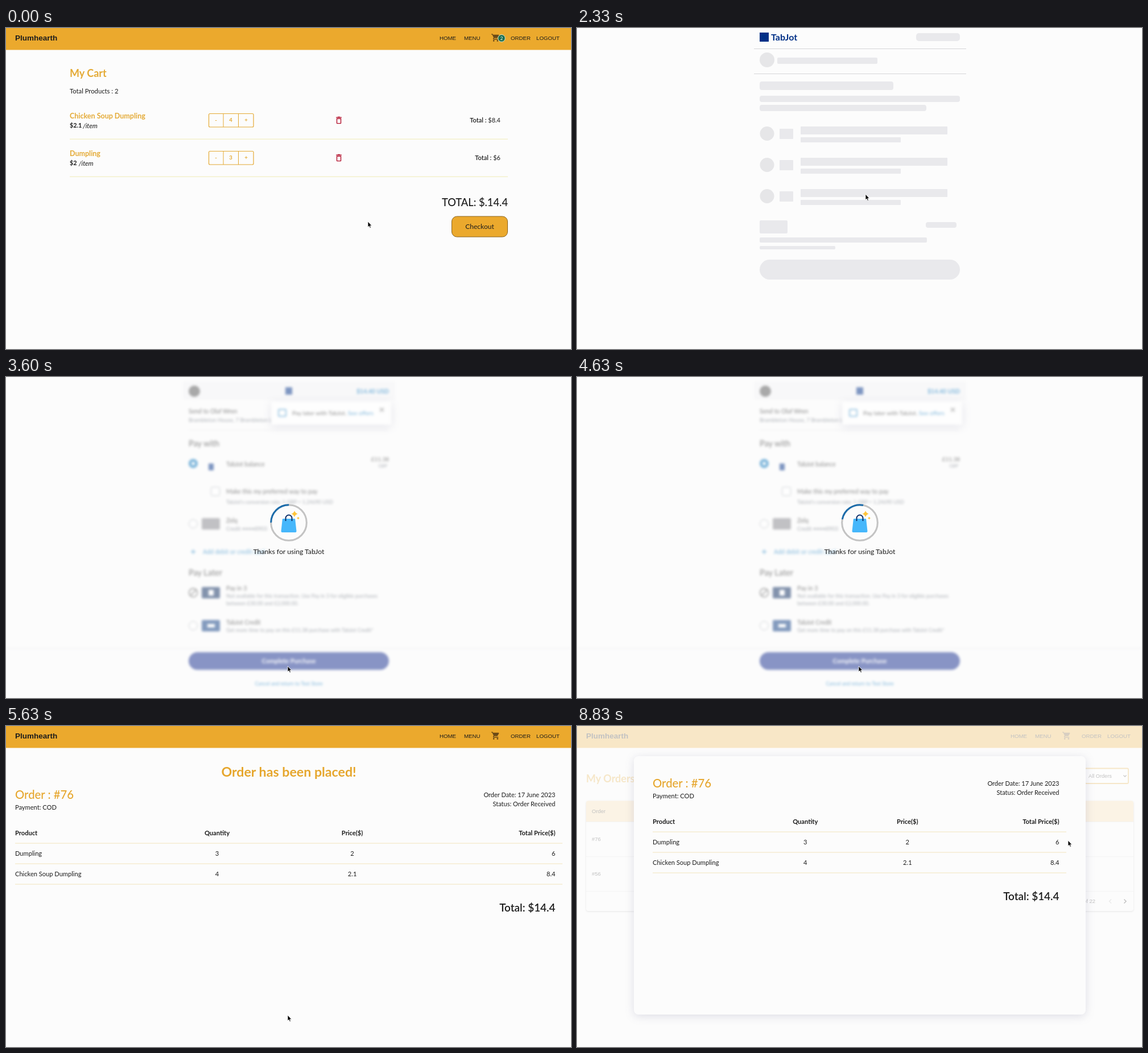
An HTML page that plays this animation: 993x564 px, repeating every 8.91 s.

```html
<!DOCTYPE html>
<html lang="en">
<head>
<meta charset="utf-8">
<title>Cart checkout</title>
<style>
html, body { margin: 0; width: 100%; height: 100%; overflow: hidden; background: #fcfcfc; }
svg { display: block; width: 993px; height: 564px; font-family: Lato, sans-serif; }
.ui { font-family: "Liberation Sans", Arial, sans-serif; }
text { white-space: pre; }
</style>
</head>
<body>
<svg id="stage" viewBox="0 0 993 564"></svg>
<script>
const LOOP = 8910, BG = '#fcfcfc', AMBER = '#eba92d', GOLD = '#e4aa35', INK = '#1c1c1c', RULE = '#f2e4bc';
const BLUE = '#0070ba', NAVY = '#142c8e';

// Drawing helpers; text is placed by its vertical middle.
const text = (x, y, s, size = 11.1, o = {}) =>
  `<text x="${x}" y="${y + size * .36}" font-size="${size}" fill="${o.fill || INK}" font-weight="${o.w || 400}"
    text-anchor="${o.at || 'start'}" ${o.more || ''}>${s}</text>`;
const mid = (x, y, s, size, o) => text(x, y, s, size, {...o, at: 'middle'});
const end = (x, y, s, size, o) => text(x, y, s, size, {...o, at: 'end'});
const box = (x, y, w, h, fill, r = 0, more = '') =>
  `<rect x="${x}" y="${y}" width="${w}" height="${h}" rx="${r}" fill="${fill}" ${more}/>`;
const dot = (x, y, r, fill, more = '') => `<circle cx="${x}" cy="${y}" r="${r}" fill="${fill}" ${more}/>`;
const path = (d, fill, more = '') => `<path d="${d}" fill="${fill}" ${more}/>`;
const line = (d, stroke, w = 1) => path(d, 'none', `stroke="${stroke}" stroke-width="${w}"`);
const group = (id, body, more = '') => `<g id="${id}" ${more}>${body}</g>`;
const shadow = a => `style="filter:drop-shadow(0 3px 8px rgba(60,60,110,${a}))"`;

const CART = 'M7 18a2 2 0 1 0 0 4a2 2 0 0 0 0-4zM1 2v2h2l3.6 7.59-1.35 2.45C4.5 15.4 5.5 17 7 17h12v-2H7.42l-.22-.37.9-1.63h7.45c.75 0 1.41-.41 1.75-1.03L20.9 5.5 20 4H5.21l-.94-2zm16 16a2 2 0 1 0 0 4a2 2 0 0 0 0-4z';
const BIN = 'M6 19c0 1.1.9 2 2 2h8c1.1 0 2-.9 2-2V7H6zM8 9h8v10H8zm7.5-5l-1-1h-5l-1 1H5v2h14V4z';

function header() {
  const nav = [[762, 'HOME'], [805, 'MENU'], [887, 'ORDER'], [932, 'LOGOUT']];
  return box(0, 0, 993, 38.5, AMBER) +
    group('hover', box(883, 7, 42, 21, 'rgba(0,0,0,.05)', 3)) +
    `<g class="ui">${text(16, 17.5, 'Plumhearth', 13.5, {w: 700})}
    ${nav.map(([x, s]) => text(x, 17.3, s, 9.7)).join('')}</g>` +
    path(CART, '#6b4a17', 'transform="translate(852.5 9) scale(.67)"') +
    group('badge', dot(871, 18, 6.3, '#1b6f50', 'stroke="#d9e6cf"') + mid(871, 18, '2', 8, {fill: '#fff'}));
}

function cartRow(y, name, price, count, total) {
  const bold = {w: 700, fill: GOLD};
  return text(112, y - 7.5, name, 12.5, bold) +
    text(112, y + 9.5, price, 10.8, {w: 700}) +
    text(120.5 + price.length * 3.6, y + 9.5, '/item', 11.5, {more: 'font-style="italic"'}) +
    box(356.5, y - 11.5, 78.5, 23.5, 'none', 2, `stroke="${GOLD}" stroke-width="1.2"`) +
    line(`M382 ${y - 12}v24M408.5 ${y - 12}v24`, GOLD) +
    [[369, '-'], [395, count], [422, '+']].map(([x, s]) => mid(x, y, s, 9.5, bold)).join('') +
    path(BIN, '#b3112d', `transform="translate(576.6 ${y - 8.4}) scale(.7)"`) +
    end(869, y, `<tspan font-weight="600">Total :</tspan> ${total}`, 11) +
    line(`M112 ${y + 33.2}h770`, '#f0ebb5');
}

function cartPage() {
  return text(112, 80, 'My Cart', 18, {w: 700, fill: GOLD}) +
    text(112, 111.3, 'Total Products : 2', 11.25) +
    cartRow(162, 'Chicken Soup Dumpling', '$2.1', 4, '$8.4') +
    cartRow(228, 'Dumpling', '$2', 3, '$6') +
    end(882, 306, 'TOTAL: $.14.4', 18.3, {w: 500}) +
    group('checkout', box(783.5, 331, 98, 36, AMBER, 9, 'stroke="#8a6420"') + mid(832.5, 349, 'Checkout', 12.1));
}

const payBox = () =>
  box(399, 218, 197, 124, BG, 8, shadow(.2)) +
  text(431, 259, 'Pay with tabjot', 11.3, {w: 700, fill: '#e39a2a'}) +
  box(431, 282.5, 132, 23, '#f7bb2f', 3) +
  box(478, 289, 9, 9, '#003087') + text(490, 294, 'TabJot', 10, {w: 700, fill: '#003087'});

function skeleton() {
  const bar = (x, y, w, h, r = 2) => box(x, y, w, h, '#e9e9ec', r);
  const disc = (y, r) => dot(334, y, r, '#e6e6e8');
  return box(321, 8, 16, 16, '#003087') + text(341, 16.5, 'TabJot', 16, {w: 700, fill: '#003087'}) +
    line('M311 36.500h373M311 80.500h373', '#d6d6d8') + disc(56, 13) +
    [[596, 9, 77, 14, 5], [352, 52, 176, 11], [321, 94, 235, 15, 4], [321, 119, 352, 11, 4], [321, 135, 293, 11, 4],
      [321, 338, 49, 23], [613, 341, 54, 10, 4], [321, 368, 294, 9], [321, 383, 133, 6], [321, 407, 352, 35, 17.5]]
      .map(a => bar(...a)).join('') +
    [173, 228, 283].map(y => disc(y + 12.5, 12.5) + bar(356, y + 4, 24, 18, 1) +
      bar(393, y, 258, 14, 1) + bar(393, y + 19, 176, 9, 1)).join('');
}

function payPage() {
  const soft = {fill: '#5c6470'}, blue = {fill: BLUE};
  const radio = y => dot(329, y, 7.5, '#fff', 'stroke="#9aa0a8"');
  const card = (y, fill) => box(344, y - 10, 32, 20, fill, 2);
  return box(311, 8, 373, 32, '#f4f4f6') + dot(331, 25, 10, '#555') + box(491, 18, 12, 13, '#003087') +
    end(673, 25, '$14.40 USD', 10.5, {...blue, w: 700}) +
    text(321, 60, 'Send to Olaf Wren', 10.5) + text(321, 76, 'Brambleton House, 7 Brambleton Lane', 9.5, soft) +
    line('M321 93h352', '#e2e2e6') +
    box(466, 43, 211, 41, '#fff', 3, shadow(.25)) + box(479, 57, 13, 12, 'none', 1, `stroke="${BLUE}" stroke-width="1.5"`) +
    text(503, 63, `Pay later with TabJot. <tspan fill="${BLUE}">See offers</tspan>`, 10.3) +
    line('M657 54l7 7m0-7l-7 7', '#555', 1.2) +
    text(321, 117, 'Pay with', 14.5) + dot(329, 152, 5.5, '#fff', `stroke="${BLUE}" stroke-width="5"`) +
    box(356, 152, 9, 12, '#003087') + text(387, 153, 'TabJot balance', 10.5) +
    end(673, 144, '£11.38', 10) + end(670, 156, 'GBP', 8, soft) +
    box(360.5, 193.5, 15, 15, '#fff', 2, 'stroke="#9aa0a8"') + text(387, 201, 'Make this my preferred way to pay', 10.6) +
    text(387, 220, "TabJot's conversion rate: 1 GBP = 1.24690 USD", 9, soft) +
    radio(258) + card(258, '#85858b') + text(387, 252, 'Zelq', 10.5) + text(387, 267, 'Credit ••••8903', 9.5, soft) +
    line('M325 307h8m-4-4v8', BLUE, 1.3) + text(346, 307, 'Add debit or credit card', 10.5, blue) +
    text(321, 344, 'Pay Later', 14.5) + dot(329, 379, 7.5, 'none', 'stroke="#333" stroke-width="1.4"') + line('M324 384l10-10', '#333', 1.4) +
    card(379, '#0a2a5e') + box(356, 374, 9, 10, '#fff') + text(387, 371, 'Pay in 3', 10.5) +
    text(387, 385, 'Not available for this transaction. Use Pay in 3 for eligible purchases', 9, soft) +
    text(387, 398, 'between £30.00 and £2,000.00.', 9, soft) +
    radio(437) + card(437, '#0a3a80') + box(354, 434, 13, 6, '#fff') + text(387, 431, 'TabJot Credit', 10.5) +
    text(387, 445, 'Get more time to pay on this £11.38 purchase with TabJot Credit*', 9, soft) +
    line('M0 476.500h993', '#dddde4') + box(321, 483.5, 352, 31, NAVY, 15.5) +
    mid(497, 499, 'Complete Purchase', 11, {w: 700, fill: '#fff'}) +
    mid(497, 538.5, 'Cancel and return to Test Store', 8.8, blue);
}

function thanks() {
  const star = (x, y, r) => path(`M${x} ${y - r}q${r * .25} ${r * .75} ${r} ${r}q${-r * .75} ${r * .25} ${-r} ${r}q${-r * .25} ${-r * .75} ${-r} ${-r}q${r * .75} ${-r * .25} ${r} ${-r}z`, '#ffc439');
  return dot(497, 256, 31.3, 'none', 'stroke="#c3c3c3" stroke-width="3"') +
    group('arc', line('M465.7 256A31.3 31.3 0 0 1 497 224.7', '#1b6cab', 3)) +
    path('M487 249h20q1 0 1.2 1l2.3 21q0 2-2 2h-23q-2 0-2-2l2.3-21q.2-1 1.2-1z', '#46b7fb') +
    line('M491.5 253v-5a5.5 5.5 0 0 1 11 0v5', '#0b2f6b', 2) + star(507, 240.5, 5.5) + star(513.5, 248, 2.5) +
    mid(497, 307, 'Thanks for using TabJot', 12.2);
}

// Order summary: left edge, width and title height.
function order(x, w, y) {
  const row = (dy, cells, o) => cells.map((s, i) =>
    [text, mid, mid, end][i](x + [0, w * .369, w * .616, w - 12.5][i], y + dy, s, 11.1, o)).join('') +
    line(`M${x} ${y + dy + 18}h${w}`, RULE);
  const right = x + w - 12.5;
  return text(x, y, 'Order : #76', 20.3, {w: 500, fill: '#e6a62c'}) + text(x, y + 22, 'Payment: COD') +
    end(right, y, 'Order Date: 17 June 2023', 11) + end(right, y + 16, 'Status: Order Received', 11) +
    row(67, ['Product', 'Quantity', 'Price($)', 'Total Price($)'], {w: 700}) +
    row(103, ['Dumpling', 3, 2, 6]) + row(139, ['Chicken Soup Dumpling', 4, 2.1, 8.4]) +
    end(right, y + 198.5, 'Total: $14.4', 18.9, {w: 600});
}

function orderList() {
  const row = (y, id, status, time, fill, ink) => text(26, y, id, 9.5) +
    box(309.5, y - 10, 118, 20, fill, 10, `stroke="${ink}"`) +
    mid(369, y, status, 9.4, {w: 600, fill: ink, more: 'font-family="Lato, sans-serif" letter-spacing=".3"'}) +
    mid(695.5, y, time, 9.5) +
    line(`M853 ${y - 2}q7.3-10 14.6 0q-7.3 10-14.6 0z`, '#dfa336', 1.3) +
    dot(860.3, y - 2, 2.3, 'none', 'stroke="#dfa336" stroke-width="1.3"');
  return text(16, 93, 'My Orders', 18, {w: 700, fill: GOLD}) +
    `<g class="ui">${box(893, 74.5, 76, 26.5, '#fff', 2, `stroke="${GOLD}" stroke-width="1.8"`)}
    ${text(899, 88, 'All Orders', 9.2)}${line('M960.5 86.5l2.5 2.7 2.5-2.7', '#333', 1.2)}
    ${box(16, 131.5, 962, 193.5, BG, 4, 'style="filter:drop-shadow(0 1px 1.5px rgba(0,0,0,.35))"')}
    ${path('M16 168.5V135.5q0-4 4-4H974q4 0 4 4V168.5z', '#fadba2')}
    ${text(26, 150, 'Order', 9.5)}${mid(369, 150, 'Status', 9.5)}${mid(695.5, 150, 'Time', 9.5)}${mid(868, 150, 'Actions', 9.5)}
    ${line('M16 168.5h962M16 229.5h962M16 290.5h962', '#dedede')}
    ${row(199, '#76', 'Order Received', 'a few seconds ago', '#bfdaf8', '#6384b4')}
    ${row(260, '#56', 'Completed', '4 months ago', '#cdebd0', '#67a06c')}
    ${end(911, 308, '1–6 of 22', 9.5)}${line('M939 304.5l-3.5 3.5 3.5 3.5', '#b5b5b5', 1.4)}
    ${line('M961.5 304.5l3.5 3.5-3.5 3.5', '#222', 1.6)}</g>`;
}

const spokes = () => Array.from({length: 12}, (_, i) =>
  `<path class="spoke" d="M497 267.5v-14" stroke="${AMBER}" stroke-width="6.5" stroke-linecap="round" transform="rotate(${i * 30} 497 280)"/>`).join('');

const veil = (id, fill) => group(id, box(0, 0, 993, 564, fill));

document.getElementById('stage').innerHTML =
  box(0, 0, 993, 564, BG) + header() + group('cart', cartPage()) +
  group('placed', mid(497, 80.5, 'Order has been placed!', 23.2, {w: 700, fill: '#e6a62c'}) + order(16, 962, 121)) +
  group('list', orderList()) + veil('haze', 'rgba(252,252,252,.74)') + group('payBox', payBox()) +
  group('detail', box(100, 53, 794, 454, BG, 8, shadow(.16)) + order(133, 727, 101)) +
  group('loader', box(0, 0, 993, 564, 'rgba(0,0,0,.55)') + spokes()) +
  veil('popup', BG) + group('skeleton', skeleton()) + group('payPage', payPage()) + group('thanks', thanks()) +
  group('status', box(-1, 550.5, 331.5, 15, '#dce7e8', 2, 'stroke="#8b9698"') +
    text(3, 557.5, 'localhost:5173/orders/myorders', 8.2, {fill: '#33474d'}), 'class="ui"') +
  group('arrow', path('M0 0v10l2.2-2 1.5 3.4 1.7-.8-1.5-3.2h3z', '#000', 'stroke="#fff" stroke-width=".8"')) +
  group('hand', path('M-1 1q1-1.5 2 0v3.5l4.5 1q1 .5 .8 2l-1 3.5h-5l-3.3-4.5q0-1.5 1.5-.7l.5.6z', '#fff', 'stroke="#111" stroke-width=".9"'));

const el = id => document.getElementById(id);
const spokeEls = [...document.querySelectorAll('.spoke')];
const clamp = v => Math.min(1, Math.max(0, v));

// Moments when the screen changes.
const PAY = 420, POPUP = 870, LOAD = 1980, CHOOSE = 2840, THANKS = 3470, RETURN = 4740,
  PLACED = 5250, HOVER = 6410, LIST = 6740, LEAVE = 7770, DETAIL = 8190;

// [start, end, fade-in] for each time a part is on screen.
const SHOWN = {
  badge: [[0, PLACED]], cart: [[0, PLACED]], checkout: [[0, PAY]],
  haze: [[PAY, PLACED, 120], [DETAIL, LOOP, 180]], payBox: [[PAY, PLACED, 120]],
  popup: [[POPUP, RETURN]], skeleton: [[LOAD, CHOOSE]], payPage: [[CHOOSE, RETURN]], thanks: [[THANKS, RETURN, 60]],
  loader: [[RETURN, PLACED]], placed: [[PLACED, LIST]], list: [[LIST, LOOP]], detail: [[DETAIL, LOOP, 180]],
  status: [[HOVER, LEAVE]], hover: [[HOVER, LEAVE]],
  hand: [[310, PAY], [700, POPUP], [3220, THANKS], [HOVER, LEAVE], [8060, DETAIL]]
};
const MOVES = [[0, 636, 340], [90, 636, 340], [330, 830, 347], [480, 830, 347], [720, 507, 292], [2880, 507, 292],
  [3270, 495, 508], [5800, 495, 508], [6450, 909, 17], [7740, 909, 17], [8080, 861, 197], [8300, 861, 197], [8550, 863, 201]];

function alpha(id, t) {
  const span = SHOWN[id].find(([a, b]) => t >= a && t < b);
  return !span ? 0 : span[2] ? clamp((t - span[0]) / span[2]) : 1;
}

function pointer(t) {
  const i = MOVES.findLastIndex(m => m[0] <= t), a = MOVES[i], b = MOVES[i + 1] || a;
  const k = b === a ? 0 : (t - a[0]) / (b[0] - a[0]), e = k * k * (3 - 2 * k);
  return [a[1] + (b[1] - a[1]) * e, a[2] + (b[2] - a[2]) * e];
}

function draw(t) {
  for (const id in SHOWN) {
    const a = alpha(id, t);
    el(id).style.display = a ? '' : 'none';
    el(id).style.opacity = a;
  }
  const blur = alpha('thanks', t);
  el('payPage').style.filter = blur ? `blur(${1.9 * blur}px) opacity(${1 - .5 * blur})` : '';
  el('arc').setAttribute('transform', `rotate(${(t - 3600) * .36} 497 256)`);
  const head = Math.floor((t - 4900) / 62.5);
  spokeEls.forEach((s, i) => {
    const age = (((head - i) % 12) + 12) % 12;
    s.style.opacity = 1 - .9 * (age / 11) ** 2.2;
  });
  const [x, y] = pointer(t);
  for (const id of ['arrow', 'hand']) el(id).setAttribute('transform', `translate(${x} ${y})`);
  el('arrow').style.display = alpha('hand', t) ? 'none' : '';
}

const began = performance.now();
function tick() {
  draw((performance.now() - began) % LOOP);
  requestAnimationFrame(tick);
}
tick();
</script>
</body>
</html>
```
